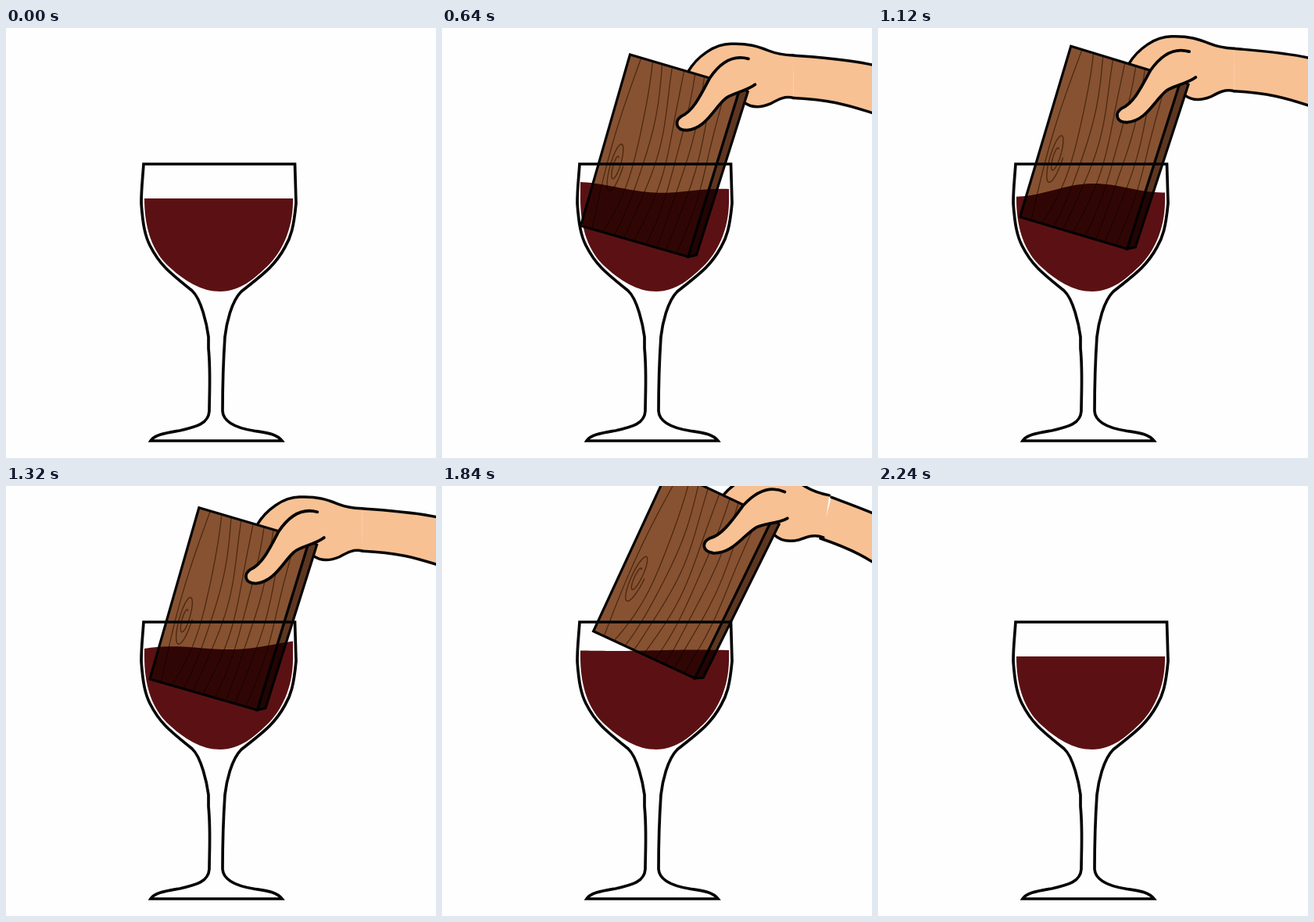
These frames come from a looping animation (550 by 550 pixels, 2.8 s). An HTML page with a canvas:

```html
<!DOCTYPE html>
<html lang="en">
<head>
<meta charset="utf-8">
<title>Wood in wine</title>
<style>
  html, body { margin: 0; width: 100%; height: 100%; overflow: hidden; background: #fefefe; }
  canvas { display: block; width: 550px; height: 550px; }
</style>
</head>
<body>
<canvas id="stage"></canvas>
<script>
const LOOP = 2800, SIZE = 550, RAD = Math.PI / 180, TAU = Math.PI * 2;
const ENTER = 280, EXIT = 1700, GONE = 2160, STILL = 2240;
const PAPER = '#fefefe', INK = '#050505', WINE = '#5b1113', SKIN = '#f8c193';
const WOOD = '#875232', EDGE = '#5e3620', GRAIN = '#4c2911';

// Glass and wine bowl, in stage units
const glass = new Path2D(`
  M176 174 C175 190 173 206 173 224 C175 252 178 266 184 278 C196 302 208 312 238 336
  C250 347 257 380 259 395 L259 410 C262 440 260 470 260 490
  C259 506 244 510 222 515 C205 518 190 520 185 528 L353 528
  C346 519 334 518 316 515 C298 512 278 506 277 490
  C277 465 277 440 280 395 C282 378 288 350 301 337
  C330 314 344 304 357 280 C364 268 368 256 371 224 L369.5 174 Z`);
const bowl = new Path2D(`
  M177 180 L177 218 C177 250 184 280 205 302 C228 324 250 337 274 337
  C300 337 318 320 334 305 C352 288 367 258 367 222 L367 180 Z`);

// Hand, drawn for a board whose corner is at 180,238 with a 17 degree tilt
const handTop = 'M320 44 C332 24 355 8 376 8.5 C398 8 410 12 424 18 C436 23 446 24 455 24.5';
const handBottom = 'M455 79 C444 76 436 80 425 86 C410 92 400 90 392 84';
const armTop = 'M455 24.5 C480 27 520 30 550 37 L800 90';
const armBottom = 'M800 185 L550 98 C520 88 500 82 455 79';
const thumb = `M398 28 C378 22 362 32 348 52 C336 74 326 94 311 100
  C302 106 303 118 318 118 C342 116 352 92 367 79 C374 72 394 70 406 61`;

// Board, in its own units: bottom left corner at the origin
const face = new Path2D('M0 0 L143 0 L147 -227 L0 -228 Z');
const side = new Path2D('M143 0 L152.5 -5 L158 -224 L147 -227 Z');

const canvas = document.getElementById('stage');
const ctx = canvas.getContext('2d');
const dpr = window.devicePixelRatio || 1;
canvas.width = canvas.height = SIZE * dpr;

const clamp = v => Math.min(1, Math.max(0, v));
const ramp = (t, from, to) => {
  const v = clamp((t - from) / (to - from));
  return v * v * (3 - 2 * v);
};

function fill(path, color) {
  ctx.fillStyle = color;
  ctx.fill(path);
}

function stroke(path, width, color = INK) {
  ctx.lineWidth = width;
  ctx.strokeStyle = color;
  ctx.stroke(path);
}

// Path through point(0) .. point(1)
function plot(point, count) {
  const path = new Path2D();
  for (let i = 0; i <= count; i++) path.lineTo(...point(i / count));
  return path;
}

// Drawings are held for one beat
function hold(t) {
  if (t < ENTER) return 0;
  const beat = (t >= 840 && t < 1400) || t >= 2000 ? 40 : 80;
  return Math.max(ENTER, Math.floor(t / beat) * beat);
}

// Board corner and tilt: swing in, bob in the wine, swing out
function boardPose(t) {
  const bob = Math.cos(TAU * (t - 960) / 720);
  const plunge = 10 * Math.exp(-(((t - 680) / 60) ** 2));
  const before = 1 - Math.sin(Math.PI / 2 * clamp((t - ENTER) / 366));
  const after = Math.max(0, (t - EXIT) / 379.5) ** 1.5;
  return {
    x: 182 - 2 * bob - plunge + 112 * before ** 2 + 239 * after ** 2,
    y: 242.5 - 4.5 * bob + plunge - 250 * (before + after),
    tilt: 16.5 + 0.5 * bob + 27.4 * before + 37 * after
  };
}

// Height of the wine at u = 0 (left) to 1 (right)
function wineHeight(u, t) {
  if (t >= STILL) return 218;
  const dip = ramp(t, 440, 640) - ramp(t, 1760, 1960);
  const lean = -10 * Math.sin(Math.PI * (t - 960) / 900);
  const slosh = -11 * Math.exp(-Math.abs(t - 960) / 360);
  const turn = (t - 960) / 360 * (TAU + 0.8);
  const settle = t < 1840 ? 0 : 5.3 * ramp(t, 1840, 1960) * clamp((STILL - t) / 320);
  return 218 - 12 * dip
    + dip * (lean * (u - 0.5) + slosh * Math.cos(TAU * u - turn))
    + settle * Math.cos(TAU * u - 0.6 - (t - 2000) / 80);
}

function inBoard(pose, draw) {
  ctx.save();
  ctx.translate(pose.x, pose.y);
  ctx.rotate(pose.tilt * RAD);
  draw();
  ctx.restore();
}

function inHand(pose, draw) {
  inBoard(pose, () => {
    ctx.rotate(-17 * RAD);
    ctx.translate(-180, -238);
    draw();
  });
}

function limb(top, bottom) {
  fill(new Path2D(top + bottom.replace('M', 'L')), SKIN);
  stroke(new Path2D(top), 3.5);
  stroke(new Path2D(bottom), 3.5);
}

function drawArm(pose) {
  inHand(pose, () => {
    ctx.save();
    ctx.translate(440, 50);
    ctx.rotate(Math.max(0, pose.tilt - 17) * 0.9 * RAD);
    ctx.translate(-440, -50);
    limb(armTop, armBottom.replace('M800', 'M800'));
    ctx.restore();
    limb(handTop, handBottom);
  });
}

function drawThumb(pose) {
  inHand(pose, () => {
    fill(new Path2D(thumb + ' L420 42 Z'), SKIN);
    stroke(new Path2D(thumb), 3.8);
  });
}

function drawGrain() {
  const edgeLine = v => [15 - 5 * Math.sin(Math.PI * v), -228 * v];
  stroke(plot(edgeLine, 16), 1.3, GRAIN);
  for (let i = 0; i < 8; i++) {
    const line = v => {
      const bulge = (14 - i * 1.3) * Math.sin(Math.PI * v ** 0.9);
      return [29 + i * 14.2 + bulge + 1.2 * Math.sin(v * 8 + i * 1.7), -228 * v];
    };
    stroke(plot(line, 24), 1.3, GRAIN);
  }
  const knot = v => {
    const a = v * 3.6 * Math.PI, r = 1 - 0.75 * v;
    return [22 + 9 * r * Math.cos(a), -88 + 39 * r * Math.sin(a)];
  };
  stroke(plot(knot, 60), 1.4, GRAIN);
}

function drawBoard(pose) {
  inBoard(pose, () => {
    fill(side, EDGE);
    stroke(side, 3.2);
    fill(face, WOOD);
    ctx.save();
    ctx.clip(face);
    drawGrain();
    ctx.restore();
    stroke(face, 3.2);
  });
}

// Multiplying lets the dipped wood show through
function drawWine(t) {
  const body = plot(u => [170 + 204 * u, wineHeight((204 * u - 7) / 190, t)], 40);
  body.lineTo(374, 345);
  body.lineTo(170, 345);
  ctx.save();
  ctx.clip(bowl);
  ctx.globalCompositeOperation = 'multiply';
  fill(body, WINE);
  ctx.restore();
}

function draw(now) {
  const t = hold(now);
  ctx.setTransform(dpr, 0, 0, dpr, 0, 0);
  ctx.lineCap = 'round';
  ctx.fillStyle = PAPER;
  ctx.fillRect(0, 0, SIZE, SIZE);
  if (t >= ENTER && t < GONE) {
    const pose = boardPose(t);
    drawArm(pose);
    drawBoard(pose);
    drawThumb(pose);
  }
  drawWine(t);
  stroke(glass, 3.7);
}

const start = performance.now();
function tick() {
  draw((performance.now() - start) % LOOP);
  requestAnimationFrame(tick);
}
tick();
</script>
</body>
</html>
```
